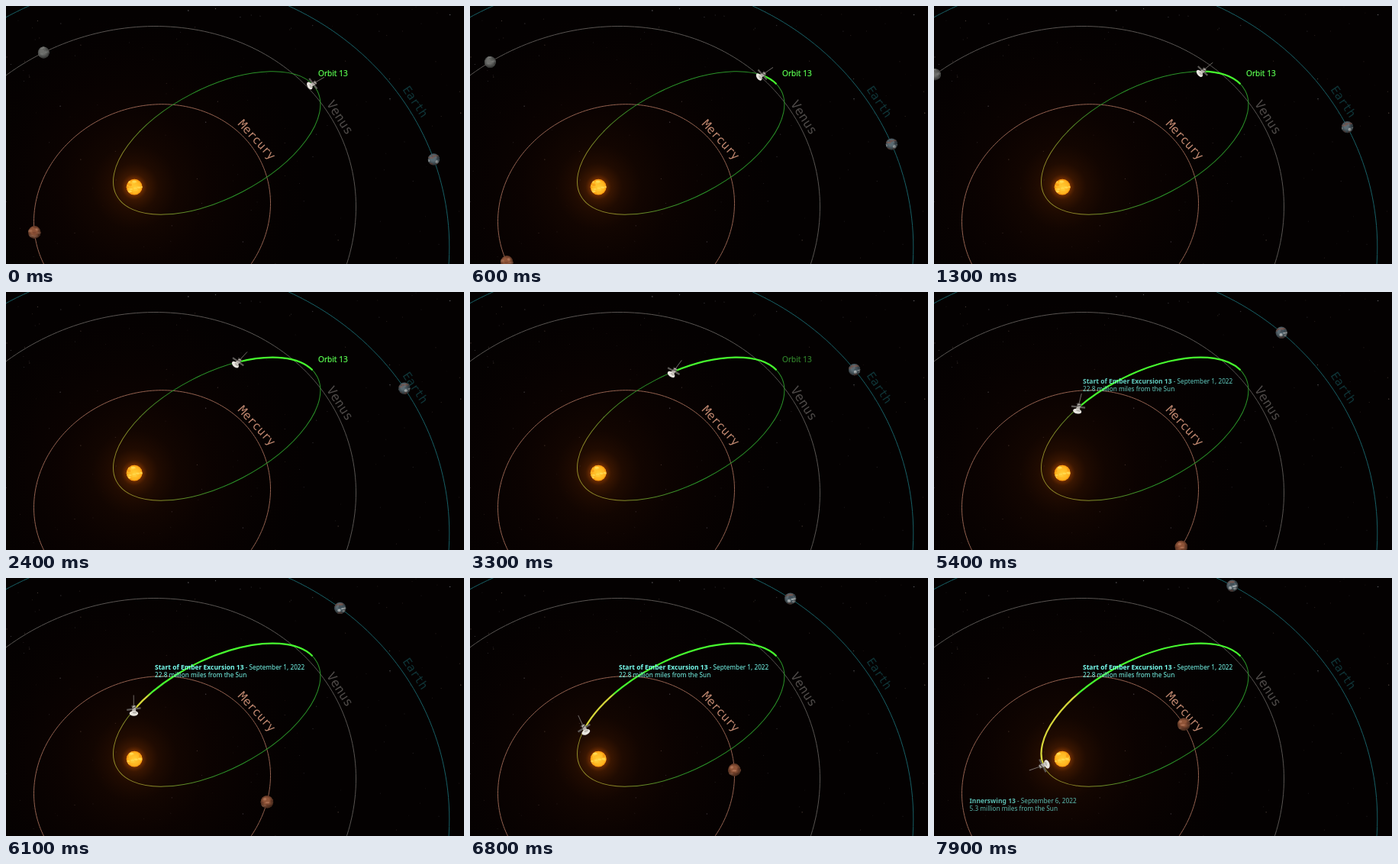
These frames come from a looping animation (600x338 px, 8000 ms). An HTML page:

```html
<!DOCTYPE html>
<html lang="en">
<head>
<meta charset="utf-8">
<title>Orbit</title>
<style>
  html, body { margin: 0; width: 100%; height: 100%; overflow: hidden; background: #040101; }
  svg { display: block; width: 100vw; height: 100vh; }
  .line { fill: none; stroke-width: 1; }
  .name { font: 15.3px "DejaVu Sans Mono", "Noto Sans Mono", monospace; text-anchor: middle; dominant-baseline: central; }
  .tag { font: 10.1px "Noto Sans", "Open Sans", sans-serif; fill: #5cff52; stroke: #5cff52; stroke-width: .2; }
  .note { font: 8.25px "Noto Sans", "Open Sans", sans-serif; fill: #78fff0; }
  .note .b { font-weight: 700; font-size: 8.5px; }
</style>
</head>
<body>
<svg viewBox="0 0 600 338" preserveAspectRatio="none">
  <defs>
    <radialGradient id="glow">
      <stop offset="0" stop-color="#ff7a08" stop-opacity=".75"/>
      <stop offset=".045" stop-color="#c85204" stop-opacity=".55"/>
      <stop offset=".075" stop-color="#8a3602" stop-opacity=".4"/>
      <stop offset=".14" stop-color="#5a2000" stop-opacity=".32"/>
      <stop offset=".25" stop-color="#3a1200" stop-opacity=".26"/>
      <stop offset=".45" stop-color="#240800" stop-opacity=".22"/>
      <stop offset="1" stop-color="#140400" stop-opacity="0"/>
    </radialGradient>
    <radialGradient id="sunFill">
      <stop offset="0" stop-color="#ffcc34"/>
      <stop offset=".8" stop-color="#ffb420"/>
      <stop offset="1" stop-color="#ff940c"/>
    </radialGradient>
    <radialGradient id="shade" cx=".45" cy=".4" r=".6">
      <stop offset=".4" stop-color="#000" stop-opacity="0"/>
      <stop offset="1" stop-color="#000" stop-opacity=".55"/>
    </radialGradient>
    <linearGradient id="thin" gradientUnits="userSpaceOnUse" x1="-120" x2="-30">
      <stop offset="0" stop-color="#8f8a28"/>
      <stop offset="1" stop-color="#2a9428"/>
    </linearGradient>
    <linearGradient id="bold" gradientUnits="userSpaceOnUse" x1="-71" x2="-62">
      <stop offset="0" stop-color="#d6d63a"/>
      <stop offset="1" stop-color="#46f92e"/>
    </linearGradient>
    <clipPath id="disc"><circle r="1"/></clipPath>
  </defs>

  <g id="stars"></g>
  <circle cx="168" cy="237" r="225" fill="url(#glow)"/>
  <g id="orbits"></g>

  <g class="name">
    <text transform="translate(328.5 175.5) rotate(47.5)" fill="#c08870">Mercury</text>
    <text transform="translate(437.5 146) rotate(57)" font-size="16.4" fill="#4e4a48">Venus</text>
    <text transform="translate(536 125.5) rotate(56)" fill="#0f3437">Earth</text>
  </g>

  <g id="probePath" class="line">
    <ellipse rx="148.3" ry="72.2" stroke="url(#thin)"/>
    <path id="trail" stroke="url(#bold)" stroke-width="2.2"/>
  </g>

  <g id="sun" transform="translate(168.2 237.2) scale(10.4)"></g>
  <g id="planets"></g>

  <g id="probe">
    <path d="M3 0H17" stroke="#77716c" stroke-width=".8"/>
    <path d="M0-8L2 8" stroke="#5e5a57" stroke-width="2"/>
    <path d="M-3-2L5-1.6V2L-3 2.6Z" fill="#b3aea8"/>
    <path d="M1-3L4 3M4-3L6 1" stroke="#4a4542" stroke-width="1"/>
    <ellipse cx="-4" rx="2.9" ry="5" fill="#e9e6e0"/>
    <ellipse cx="-3" cy="1" rx="1.2" ry="2.6" fill="#bbb7b0"/>
  </g>

  <text id="orbitTag" class="tag" x="409" y="92">Orbit 13</text>
  <g id="startNote" class="note">
    <text x="195" y="120"><tspan class="b">Start of Ember Excursion 13</tspan> - September 1, 2022</text>
    <text x="195" y="130">22.8 million miles from the Sun</text>
  </g>
  <g id="nearNote" class="note">
    <text x="46.5" y="295"><tspan class="b">Innerswing 13</tspan> - September 6, 2022</text>
    <text x="46.5" y="305">5.3 million miles from the Sun</text>
  </g>
</svg>

<script>
const LOOP = 8;
const RAD = Math.PI / 180;
const SUN = { x: 168, y: 237 };
const $ = id => document.getElementById(id);

function add(parent, tag, attrs) {
  const el = document.createElementNS("http://www.w3.org/2000/svg", tag);
  for (const key in attrs) el.setAttribute(key, attrs[key]);
  return parent.appendChild(el);
}

function seeded(seed) {
  return () => (seed = (seed * 16807) % 2147483647) / 2147483647;
}

// Sheared ellipses; angle holds start, speed and slowing in degrees.
const planets = [
  { cx: 191.5, cy: 270.5, w: 155, k: -11.9, h: 141.3, line: "#946250", r: 8.2,
    angle: [174.3, -28.07, 0.297], base: "#8f5438", spots: ["#a96c4c", "#7a452f", "#b5785c"], seed: 11 },
  { cx: 170.5, cy: 285.5, w: 288, k: -22.5, h: 258, line: "#595552", r: 7.4,
    angle: [-114.9, -8.6, 0.1], base: "#6c6d6a", spots: ["#898a86", "#5a5b58", "#7a7c78"], seed: 23 },
  { cx: 190.5, cy: 326, w: 390.3, k: -10, h: 362.2, line: "#176066", r: 7.6,
    angle: [-18.6, -5.72, 0.075], base: "#5a6a72", spots: ["#d2d6d6", "#84594c", "#3c4c56"], seed: 47 }
];

function onOrbit(o, deg) {
  const c = Math.cos(deg * RAD), s = Math.sin(deg * RAD);
  return [o.cx + o.w * c, o.cy + o.k * c + o.h * s];
}

// A unit disc with blotches that drift across it.
function blotches(parent, colors, seed, count, size) {
  const rnd = seeded(seed);
  const clip = add(parent, "g", { "clip-path": "url(#disc)" });
  const layer = add(clip, "g", {});
  for (let i = 0; i < count; i++) {
    add(layer, "ellipse", {
      cx: rnd() * 3.4 - 1.2, cy: rnd() * 2 - 1,
      rx: size * (0.6 + rnd()), ry: size * (0.3 + rnd() * 0.5),
      fill: colors[i % colors.length], opacity: 0.75
    });
  }
  return layer;
}

const rnd = seeded(97);
for (let i = 0; i < 150; i++) {
  add($("stars"), "circle", {
    cx: rnd() * 600, cy: rnd() * 338, r: 0.4 + rnd() * 0.35,
    fill: rnd() < 0.5 ? "#8d8a90" : "#8a7568", opacity: 0.15 + rnd() ** 3 * 0.6
  });
}

for (const p of planets) {
  const pts = Array.from({ length: 241 }, (_, i) => onOrbit(p, i * 1.5).map(v => v.toFixed(2)));
  add($("orbits"), "path", { d: "M" + pts.join("L"), class: "line", stroke: p.line });
  p.el = add($("planets"), "g", {});
  add(p.el, "circle", { r: 1, fill: p.base });
  p.skin = blotches(p.el, p.spots, p.seed, 21, 0.32);
  add(p.el, "circle", { r: 1.01, fill: "url(#shade)" });
}

add($("sun"), "circle", { r: 1, fill: "url(#sunFill)" });
const sunSkin = blotches($("sun"), ["#ffdf58", "#f79a14", "#ffcc38"], 5, 30, 0.2);

// The probe's own ellipse and its eccentric angle over time.
const path = { cx: 276.2, cy: 179.4, a: 148.3, b: 72.2, tilt: -27.5 };
$("probePath").setAttribute("transform", `translate(${path.cx} ${path.cy}) rotate(${path.tilt})`);
const keys = [[0, -8.4], [1.3, -42.2], [2.4, -64.2], [4.2, -95.3], [5.4, -115.9], [6.8, -144.3], [7.9, -177.9], [8, -181]];

function slope(i) {
  const p = keys[Math.max(i - 1, 0)], n = keys[Math.min(i + 1, keys.length - 1)];
  return (n[1] - p[1]) / (n[0] - p[0]);
}

function probeAngle(t) {
  let i = 0;
  while (i < keys.length - 2 && t >= keys[i + 1][0]) i++;
  const [t0, v0] = keys[i], [t1, v1] = keys[i + 1];
  const d = t1 - t0, u = (t - t0) / d, w = 1 - u;
  return v0 * (1 + 2 * u) * w * w + slope(i) * d * u * w * w
       + v1 * u * u * (3 - 2 * u) - slope(i + 1) * d * u * u * w;
}

const local = deg => [path.a * Math.cos(deg * RAD), path.b * Math.sin(deg * RAD)];
const ramp = (t, from, to) => Math.min(1, Math.max(0, (t - from) / (to - from)));

function draw(t) {
  for (const p of planets) {
    const [start, speed, slow] = p.angle;
    const [x, y] = onOrbit(p, start + speed * t + slow * t * t);
    p.el.setAttribute("transform", `translate(${x} ${y}) scale(${p.r})`);
    p.skin.setAttribute("transform", `translate(${-t * 0.12} 0)`);
  }
  sunSkin.setAttribute("transform", `translate(${-t * 0.06} 0)`);

  const [u, v] = local(probeAngle(t));
  const c = Math.cos(path.tilt * RAD), s = Math.sin(path.tilt * RAD);
  const x = path.cx + u * c - v * s, y = path.cy + u * s + v * c;
  const turn = Math.atan2(y - SUN.y, x - SUN.x) / RAD;
  $("trail").setAttribute("d", `M${local(keys[0][1])}A${path.a} ${path.b} 0 0 0 ${u} ${v}`);
  $("probe").setAttribute("transform", `translate(${x} ${y}) rotate(${turn}) scale(${1.05 + t * 0.015})`);

  $("orbitTag").setAttribute("opacity", 1 - ramp(t, 3, 3.6));
  $("startNote").setAttribute("opacity", ramp(t, 5, 5.5));
  $("nearNote").setAttribute("opacity", ramp(t, 7.5, 8.05));
}

const begin = performance.now();
function tick() {
  draw(((performance.now() - begin) / 1000) % LOOP);
  requestAnimationFrame(tick);
}
tick();
</script>
</body>
</html>
```
